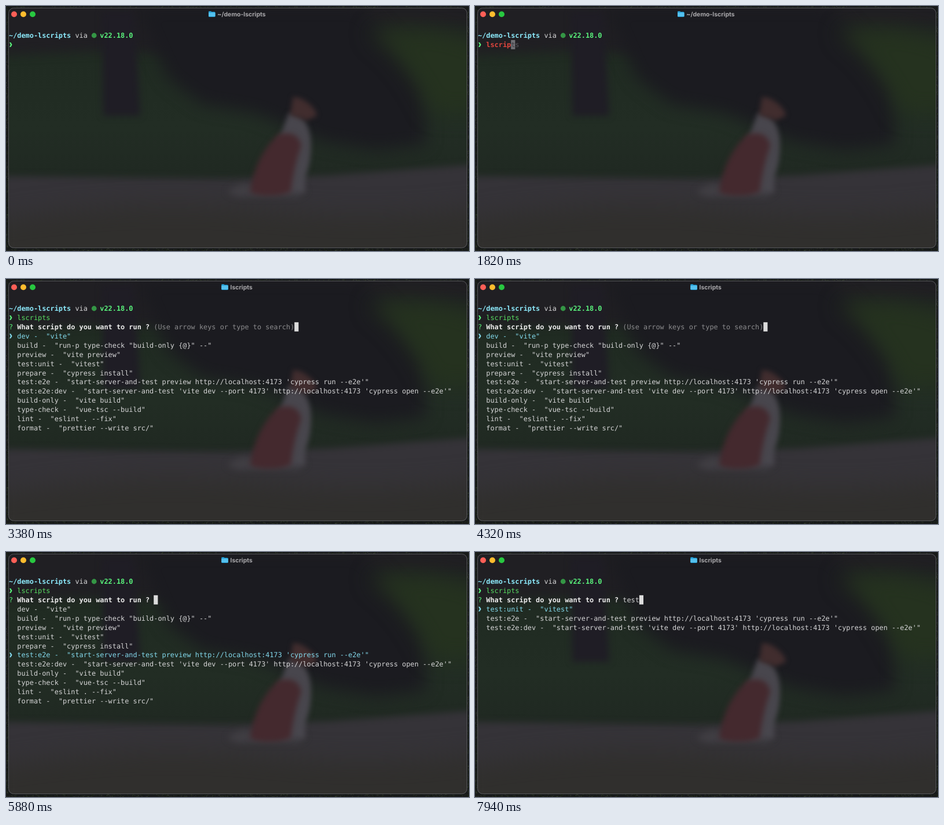
Animation, 800 px wide and 424 px high, one loop 8 s. Source, as an HTML page with a canvas:

```html
<!DOCTYPE html>
<html lang="en">
<head>
<meta charset="utf-8">
<title>Script picker in a terminal</title>
<style>
html, body { margin: 0; width: 100%; height: 100%; overflow: hidden; background: #17191a; }
canvas { display: block; width: 800px; height: 424px; }
</style>
</head>
<body>
<canvas id="stage" width="800" height="424"></canvas>
<script>
const W = 800, H = 424, LOOP = 8000;
const CELL = 7.15, ROW = 15.92, LEFT = 5, TOP = 43;
const MONO = '11.88px "DejaVu Sans Mono", monospace';
const C = {
  text: '#d5d5d6', strong: '#ececec', dim: '#8b8b8d', ghost: '#59595d',
  cyan: '#83d9ec', path: '#8ceafc', green: '#5af47c', command: '#58dc62', red: '#e2463e'
};
const COMMAND = 'lscripts', QUERY = 'test';
const SCRIPTS = [
  ['dev', 'vite'],
  ['build', 'run-p type-check "build-only {@}" --'],
  ['preview', 'vite preview'],
  ['test:unit', 'vitest'],
  ['prepare', 'cypress install'],
  ['test:e2e', "start-server-and-test preview http://localhost:4173 'cypress run --e2e'"],
  ['test:e2e:dev', "start-server-and-test 'vite dev --port 4173' http://localhost:4173 'cypress open --e2e'"],
  ['build-only', 'vite build'],
  ['type-check', 'vue-tsc --build'],
  ['lint', 'eslint . --fix'],
  ['format', 'prettier --write src/']
];

// Bursts of key presses: start, interval and number of keys.
const TYPE = { start: 1300, step: 100, n: COMMAND.length };
const ENTER = { start: 2450, step: 1, n: 1 };
const MENU = { start: 3200, step: 1, n: 1 };
const DOWN = { start: 4480, step: 135, n: 8 };
const UP = { start: 5600, step: 100, n: 7 };
const SEARCH = { start: 7250, step: 150, n: QUERY.length };
const BURSTS = [TYPE, ENTER, MENU, DOWN, UP, SEARCH];

const pressed = (burst, t) =>
  Math.max(0, Math.min(burst.n, Math.floor((t - burst.start) / burst.step) + 1));

function cursorOn(t) {
  let last = -500;
  for (const burst of BURSTS) {
    const n = pressed(burst, t);
    if (n) last = burst.start + (n - 1) * burst.step;
  }
  return (t - last) % 1000 < 500;
}

const ctx = document.getElementById('stage').getContext('2d');
const backdrop = paintBackdrop();

function seeded(seed) {
  return () => (seed = (seed * 16807) % 2147483647) / 2147483647;
}

function paintBackdrop() {
  const canvas = document.createElement('canvas');
  canvas.width = W;
  canvas.height = H;
  const g = canvas.getContext('2d');
  const shape = (color, blur, d) => {
    g.filter = `blur(${blur}px)`;
    g.fillStyle = color;
    g.fill(new Path2D(d));
  };

  // Grass around the window
  g.fillStyle = '#17191a';
  g.fillRect(0, 0, W, H);
  const random = seeded(11);
  for (let i = 0; i < 1500; i++) {
    const v = 16 + random() * 32, along = random(), side = random();
    g.fillStyle = `rgb(${v},${v + 7},${v - 5})`;
    if (side < .6) g.fillRect(along * W, side < .2 ? random() * 3 : 419 + random() * 5, 2, 1);
    else g.fillRect(side < .8 ? random() * 4 : 797 + random() * 3, along * H, 1, 2);
  }

  g.save();
  g.beginPath();
  g.roundRect(4, 3, 793, 416, 9);
  g.clip();
  const base = g.createLinearGradient(0, 0, 0, H);
  base.addColorStop(0, '#1f1e22');
  base.addColorStop(.22, '#202b22');
  base.addColorStop(.5, '#222d24');
  base.addColorStop(.68, '#202922');
  g.fillStyle = base;
  g.fillRect(0, 0, W, H);

  // Blurred park: hedge, sunlit leaves, trunk and footpath
  shape('#201f23', 9, 'M-30 -30H830V28H620L440 84L160 76L-30 84Z');
  shape('#1b1b20', 14, 'M225 0H610L680 70L725 140V240L640 250L550 235L430 185L340 170L280 125Z');
  shape('#25321f', 18, 'M625 45Q740 25 830 70V185H735Q700 100 625 45Z');
  shape('#1f1d25', 6, 'M166 10H222L232 190H168Z');
  shape('#353338', 6, 'M-30 294L380 299L560 293L830 273V460H-30Z');
  shape('#302f2d', 20, 'M-30 372Q230 330 440 352T830 345V460H-30Z');

  // Sitting dog seen from behind
  shape('#403e43', 6, 'M382 322Q410 300 432 312L520 318L505 330H400Z');
  shape('#48464d', 4, 'M488 186Q518 184 526 225Q530 262 518 294L516 322H478L470 235Z');
  shape('#44292e', 5, 'M470 222Q505 214 510 242Q497 278 492 322Q455 334 422 323Q428 264 470 222Z');
  shape('#412d2e', 4, 'M496 157L510 160Q536 175 537 190L520 198L491 189Z');

  g.filter = 'none';
  g.restore();
  g.strokeStyle = '#56575a';
  g.lineWidth = 1;
  g.beginPath();
  g.roundRect(4.5, 3.5, 792, 415, 9);
  g.stroke();

  ['#fe5f57', '#febc2e', '#28c840'].forEach((color, i) => dot(g, 14 + i * 16, 14.3, 5, color));
  return canvas;
}

function dot(g, x, y, r, color) {
  g.fillStyle = color;
  g.beginPath();
  g.arc(x, y, r, 0, Math.PI * 2);
  g.fill();
}

function write(col, row, text, color, bold) {
  ctx.font = (bold ? 'bold ' : '') + MONO;
  ctx.fillStyle = color;
  [...text].forEach((ch, i) => ctx.fillText(ch, LEFT + (col + i) * CELL, TOP + 12.1 + row * ROW));
}

function pointer(row, color) {
  const y = TOP + 8 + row * ROW;
  ctx.fillStyle = color;
  ctx.fill(new Path2D(`M6 ${y - 4}H8.2L10.6 ${y}L8.2 ${y + 4}H6L8 ${y}Z`));
}

function block(col, row, color) {
  ctx.fillStyle = color;
  ctx.fillRect(LEFT + col * CELL, TOP + row * ROW, CELL, ROW);
}

function windowTitle(text, x) {
  ctx.fillStyle = '#249bd0';
  ctx.beginPath();
  ctx.roundRect(x, 9, 5, 4, 1);
  ctx.roundRect(x, 10, 11.5, 9, 1.5);
  ctx.fill();
  ctx.fillStyle = '#55c1ee';
  ctx.fillRect(x, 11.5, 11.5, 6.5);
  ctx.font = 'bold 10.5px Inter, sans-serif';
  ctx.fillStyle = '#a9a8ab';
  ctx.fillText(text, x + 15.3, 17.7);
}

function drawShellLine(t) {
  const n = pressed(TYPE, t), typed = COMMAND.slice(0, n);
  const entered = pressed(ENTER, t), valid = typed === 'ls' || typed === COMMAND;
  const rest = n ? COMMAND.slice(n) : '';
  pointer(1, C.green);
  write(2, 1, typed, valid ? C.command : C.red, !valid);
  write(2 + n, 1, rest, C.ghost);
  if (!entered && cursorOn(t)) {
    block(2 + n, 1, rest ? '#707075' : '#dcdcdc');
    write(2 + n, 1, rest.slice(0, 1), '#38383c');
  }
}

function drawMenu(t) {
  const question = 'What script do you want to run ?';
  const hint = pressed(DOWN, t) ? '' : '(Use arrow keys or type to search)';
  const query = QUERY.slice(0, pressed(SEARCH, t));
  const selected = query ? 0 : pressed(DOWN, t) - pressed(UP, t);
  write(0, 2, '?', C.green);
  write(2, 2, question, C.strong, true);
  write(35, 2, hint, C.dim);
  write(35, 2, query, C.text);
  SCRIPTS.filter(([name]) => name.includes(query)).forEach(([name, run], i) => {
    const active = i === selected;
    if (active) pointer(3 + i, C.cyan);
    write(2, 3 + i, `${name} -  "${run}"`, active ? C.cyan : C.text);
  });
  if (cursorOn(t)) block(35 + hint.length + query.length, 2, '#dcdcdc');
}

function render(t) {
  ctx.drawImage(backdrop, 0, 0);
  if (pressed(ENTER, t)) windowTitle(COMMAND, 372.3);
  else windowTitle('~/demo-lscripts', 350);

  write(0, 0, '~/demo-lscripts', C.path, true);
  write(16, 0, 'via', C.text);
  dot(ctx, 152.2, 51, 4.4, '#349645');
  write(22, 0, 'v22.18.0', C.green, true);
  drawShellLine(t);

  if (pressed(MENU, t)) drawMenu(t);
  else if (pressed(ENTER, t) && cursorOn(t)) block(0, 2, '#dcdcdc');
}

ctx.textRendering = 'geometricPrecision';
const begin = performance.now();
function frame() {
  render((performance.now() - begin) % LOOP);
  requestAnimationFrame(frame);
}
frame();
</script>
</body>
</html>
```
